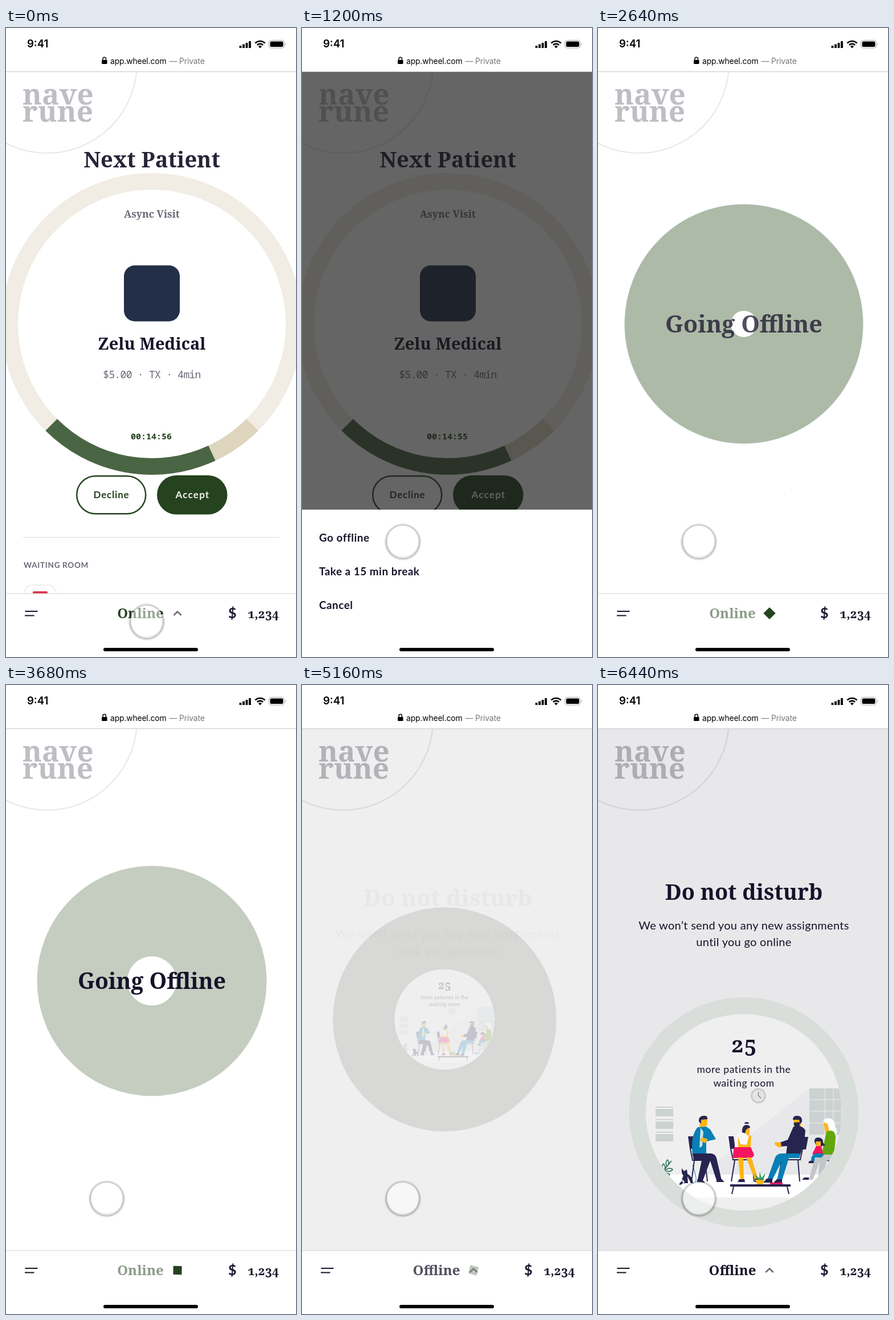
Write an HTML page that moves like this. It is 509 px wide and 1101 px high and loops after 6.48 s.

```html
<!DOCTYPE html>
<html lang="en">
<head>
<meta charset="utf-8">
<title>Going offline</title>
<style>
html, body { margin: 0; height: 100%; overflow: hidden; background: #fff; }
svg { display: block; width: 100vw; height: 100vh; }
text { fill: #17122a; white-space: pre; }
.serif { font-family: "Noto Serif", serif; font-weight: 700; font-variant-numeric: oldstyle-nums; }
.sans { font-family: Lato, sans-serif; }
.mono { font-family: "Noto Sans Mono", monospace; }
.ui { font-family: Inter, sans-serif; }
.mid { text-anchor: middle; }
.bold { font-weight: 700; }
.gray { fill: #6b6776; }
.line { fill: none; stroke: #17122a; stroke-width: 2.2; }
.navy { fill: #27244f; }
.blue { fill: #087fb5; }
.skin { fill: #ffb515; }
.pink { fill: #f4165f; }
.wall { fill: #ccd2d1; }
.seat { fill: none; stroke: #27244f; stroke-width: 2; }
</style>
</head>
<body>
<svg viewBox="0 0 509 1101">
  <defs>
    <clipPath id="hole"><circle cx="256" cy="748" r="172"/></clipPath>
    <radialGradient id="shadow">
      <stop offset=".84" stop-opacity="0"/>
      <stop offset=".86" stop-opacity=".28"/>
      <stop offset="1" stop-opacity="0"/>
    </radialGradient>
  </defs>

  <rect id="page" width="509" height="1101" fill="#fff"/>
  <circle cx="72" cy="61" r="158" fill="none" stroke="#000" stroke-opacity=".09" stroke-width="2.2"/>
  <g class="serif" font-size="51" style="font-weight:800" opacity=".27">
    <text x="29" y="134">nave</text><text x="29" y="164">rune</text>
  </g>

  <g id="ring" fill="none" stroke-width="29">
    <circle id="track" cx="256" cy="518" stroke="#f1ece4"/>
    <path id="rest" stroke="#ddd5bd"/>
    <path id="left" stroke="#4a6543"/>
  </g>
  <circle id="disc" fill="none"/>

  <g id="visit">
    <text class="serif mid" x="256" y="244" font-size="38" style="fill:#282337">Next Patient</text>
    <text class="serif mid gray" x="256" y="332" font-size="17.600">Async Visit</text>
    <rect x="207" y="415.500" width="98" height="98" rx="19" fill="#232f47"/>
    <text class="serif mid" x="256" y="563" font-size="29">Zelu Medical</text>
    <text class="mono mid gray" x="256" y="613" font-size="18" letter-spacing="-.72">$5.00 · TX · 4min</text>
    <text id="timer" class="mono mid bold" x="255" y="720" font-size="15" style="fill:#25431f"></text>
    <path d="M30 891.500H480" stroke="#d8d8d8"/>
    <text class="sans gray bold" x="31" y="945" font-size="13.500" letter-spacing=".7">WAITING ROOM</text>
    <rect x="31.500" y="975" width="57" height="57" rx="16" fill="#fff" stroke="#ddd"/>
    <rect x="47" y="986" width="26" height="26" rx="2" fill="#d7334a"/>
  </g>
  <g id="decline">
    <rect x="124.200" y="784.200" width="121" height="66" rx="33" fill="#fff" stroke="#25431f" stroke-width="2.500"/>
    <text class="sans mid bold" x="185" y="823" font-size="17" letter-spacing=".8" style="fill:#25431f">Decline</text>
  </g>
  <g id="accept">
    <rect x="265" y="783" width="123.500" height="68.500" rx="34" fill="#25431f"/>
    <text class="sans mid bold" x="327.500" y="823" font-size="17" letter-spacing="1.200" style="fill:#f6f3e9">Accept</text>
  </g>

  <g id="scene"><g clip-path="url(#hole)">
    <rect x="80" y="570" width="352" height="360" fill="#f0eff0"/>
    <path d="M368 708L180 857H432V708Z" fill="#e8e8ea"/>
    <rect x="80" y="857" width="352" height="40" fill="#fff"/>
    <text class="serif mid" x="256" y="643" font-size="37.500">25</text>
    <g class="sans mid" font-size="17.500" letter-spacing=".55">
      <text x="256" y="679">more patients in the</text><text x="256" y="703">waiting room</text>
    </g>
    <circle cx="281.500" cy="719" r="12" fill="#e4e4e4" stroke="#c4c7c7" stroke-width="2.500"/>
    <path d="M281.500 712V719L286 723" fill="none" stroke="#777" stroke-width="1.200"/>
    <path class="wall" d="M371 706H427V787H371Z"/>
    <path d="M371 726H427M371 746H427M371 767H427M398 706V787M413 706V787" stroke="#eee"/>
    <path class="wall" d="M101 738h31v17h-31zM101 760h31v17h-31zM101 782h31v17h-31z"/>
    <path d="M100 741h32M100 763h32M100 785h32" stroke="#f4f4f4" stroke-width="2"/>
    <path d="M108 862Q116 848 129 833M115 851q-5-8 0-13q6 6 0 13M121 843q-4-8 1-12q5 6-1 12M117 850q9-7 14-2q-5 6-14 2M112 857q10-5 14 0q-6 5-14 0"
      fill="none" stroke="#1e6650" stroke-width="1.500"/>
    <path class="navy" d="M147 846l4 5l5-3l1 8q8 3 10 16h-18q-3-8 1-13q-4-4-3-13zM149 866l-7 8l3 1l7-5z"/>
    <path d="M157 860l6 12h-5z" fill="#fff"/>
    <path d="M166 873q9-1 5-16t-5-17" fill="none" stroke="#087fb5"/>

    <path class="navy" d="M158 790h9l3 22h-9z"/>
    <path class="seat" d="M162 812L166 832H188M169 833L164 869M188 833L192 869"/>
    <path class="skin" d="M179 759h13v10q-2 5-7 4v5h-7z"/>
    <path class="navy" d="M177 764q-1-9 8-10q8-1 7 6l-11 1v7z"/>
    <path class="blue" d="M175 774L190 773L197 778L207 795L190 799V824H166Q162 788 175 774Z"/>
    <path d="M180 775l5 7l-2 25l-5 3z" fill="#c9e4ef"/>
    <path class="skin" d="M193 795l-11-3l-3 5l9 5z"/>
    <path class="navy" d="M166 820H199Q206 821 208 828L217 867H208L197 833L183 870H174L182 832H168Z"/>
    <path class="navy" d="M174 866h9l5 5h-14zM208 864h8l6 6h-14z"/>

    <path class="navy" d="M229 790h9l3 22h-9z"/>
    <path class="seat" d="M233 812L237 831H270M240 832L234 869M270 832L274 869"/>
    <path class="skin" d="M254 774h12v12q-3 5-7 2l-4 5z"/>
    <path class="navy" d="M253 784q-1-13 7-14q7 0 7 5q-8 0-9 10zM257 768a4 3 0 1 1 8 0z"/>
    <path d="M248 784q8-3 15 5l6 21h-29q0-20 8-26z" fill="#f8f8f8"/>
    <path class="skin" d="M246 790l4 14l11 1l4-17l4 1l-1 20l-22 2z"/>
    <path class="pink" d="M239 809H268L274 822Q273 828 265 828H236Z"/>
    <path class="skin" d="M246 827h9l1 38l-6 3zM260 827h9l12 38l-5 3z"/>
    <path class="navy" d="M248 865l9 0l1 5h-13zM276 864l6 0l6 6h-13z"/>

    <path class="navy" d="M359 791h10l-4 22h-9z"/>
    <path class="seat" d="M359 812L355 831H318M351 832L354 869M322 832L316 869"/>
    <path class="skin" d="M343 757h13v17h-7q-6 0-6-6z"/>
    <path class="navy" d="M342 761q0-7 7-7q10 0 9 10l-3 5l-2-8zM344 766l10-1v9h-6q-5-2-4-8z"/>
    <path class="navy" d="M343 773Q359 769 364 780Q363 800 353 828H329L332 807L319 808V801L333 796Z"/>
    <path class="skin" d="M321 801l-10-1l-1 4l6 5h6z"/>
    <path class="blue" d="M354 828H325L306 866H297L311 827Q314 820 323 820H354ZM335 828L323 867H314L324 826Z"/>
    <path class="navy" d="M296 864h10v7h-16zM314 865h9v6h-15z"/>

    <path class="seat" d="M407 832H390M405 832L408 866"/>
    <path class="skin" d="M396 765h10l2 18h-9z"/>
    <path d="M395 765q3-9 14-6q8 4 7 14q7 10 0 15q-8 1-10-7l-3-13z" fill="#fff"/>
    <path d="M401 782q15-7 16 10l-3 32h-22z" fill="#62a60c"/>
    <path d="M392 822h23q-3 11-13 10l-9 36h-7l3-34l-12 32h-7l10-36z" fill="#c3c6c8"/>
    <path class="navy" d="M362 862h8v4h-12zM385 863h8v4h-12z"/>
    <path class="navy" d="M380 800q-1-8 7-8q9 1 8 9l4 5l-6 1h-9z"/>
    <path class="skin" d="M382 799h9v10h-7z"/>
    <path class="pink" d="M383 807h9l4 17h-15l-5-3z"/>
    <path class="blue" d="M381 820h15l-3 7h-12l-2 9h-6l2-11z"/>
    <path class="navy" d="M371 833h7v4h-9z"/>

    <path class="navy" d="M232 874H338V878H232Z"/>
    <path class="seat" d="M238 878L235 891M332 878L335 891"/>
    <path d="M276 866h16l-3 8h-10z" fill="#ffb515"/>
    <path d="M280 866l-6-10l9 7l1-11l3 11l7-9l-4 13z" fill="#3b9a5b"/>
    <path class="pink" d="M302 871h22v3h-22z"/>
  </g></g>

  <text id="going" class="serif mid" font-size="39" x="256" y="532">Going Offline</text>
  <g id="quiet">
    <text class="serif mid" x="256" y="376" font-size="37.800">Do not disturb</text>
    <g class="sans mid" font-size="20" letter-spacing=".3">
      <text x="256" y="428">We won’t send you any new assignments</text>
      <text x="256" y="457">until you go online</text>
    </g>
  </g>

  <path d="M0 990H509V1101H0Z" fill="#fff"/>
  <path d="M0 990H509" stroke="#d3d3d5"/>
  <path class="line" d="M33.500 1021H55.500M33 1028.500H49.500"/>
  <text id="online" class="serif mid" x="236" y="1033" font-size="24" style="fill:#25431f">Online</text>
  <text id="offline" class="serif mid" x="236" y="1033" font-size="24">Offline</text>
  <path id="chevron" d="M294.500 1028L301 1021.500L307.500 1028" fill="none" stroke="#6b6776" stroke-width="2.500"/>
  <rect id="spinner" x="-7.500" y="-7.500" width="15" height="15" fill="#25431f"/>
  <text class="sans bold" x="390" y="1033" font-size="25">$</text>
  <text class="serif" x="479" y="1033" font-size="20.800" text-anchor="end">1,234</text>

  <rect id="shade" y="77" width="509" height="1024" fill="#1c1c1c"/>
  <g id="sheet" class="sans bold" font-size="18.800" letter-spacing=".55">
    <rect y="843" width="509" height="260" fill="#fff"/>
    <text x="30" y="899">Go offline</text>
    <text x="30" y="958">Take a 15 min break</text>
    <text x="30" y="1017">Cancel</text>
  </g>

  <g id="touch">
    <circle cy="1.500" r="33" fill="url(#shadow)"/>
    <circle r="28" fill="#fff" fill-opacity=".52" stroke="#d0d0d0" stroke-width=".8"/>
  </g>

  <rect width="509" height="76" fill="#fff"/>
  <path d="M0 76.500H509" stroke="#c8c8c8"/>
  <g class="ui">
    <text x="37" y="34" font-size="18.500" font-weight="600" style="fill:#000">9:41</text>
    <text x="183" y="63" font-size="13.800" letter-spacing="-.1" style="fill:#000">app.wheel.com</text>
    <text x="286.500" y="63" font-size="13.800" letter-spacing="-.1" style="fill:#777">— Private</text>
  </g>
  <rect x="168" y="56" width="9.500" height="7" rx="1.300"/>
  <path d="M170 57V54a2.700 2.700 0 0 1 5.400 0V57" fill="none" stroke="#000" stroke-width="1.400"/>
  <path d="M411.500 35V31M417 35V28.500M422.500 35V26M428 35V23" stroke="#000" stroke-width="3.800"/>
  <path d="M437.500 26.500a12 12 0 0 1 17 0M440.800 29.800a7.400 7.400 0 0 1 10.400 0" fill="none" stroke="#000" stroke-width="2.600"/>
  <path d="M446 35.500l-3-3.200a4.300 4.300 0 0 1 6 0z"/>
  <rect x="461.500" y="21.500" width="27" height="13.500" rx="4" fill="none" stroke="#aaa"/>
  <rect x="463.500" y="23.500" width="23" height="9.500" rx="2.300"/>
  <path d="M490.500 26v4.500q2-2.200 0-4.500z" fill="#999"/>
  <rect x="171" y="1085" width="166" height="6" rx="3"/>
</svg>
<script>
const $ = id => document.getElementById(id);
const set = (id, attrs) => { for (const k in attrs) $(id).setAttribute(k, attrs[k]); };
const fade = (id, opacity) => set(id, { opacity });
const clamp = x => Math.min(1, Math.max(0, x));
const span = (t, a, b) => clamp((t - a) / (b - a));
const mix = (a, b, p) => a + (b - a) * p;
const inOut = p => p < .5 ? 2 * p * p : 1 - 2 * (1 - p) ** 2;
const out = p => 1 - (1 - p) ** 2;
const zoom = (x, y, s) => `translate(${x} ${y}) scale(${s}) translate(${-x} ${-y})`;

// Piecewise blend through rows of [time, ...values]
function track(rows, t, ease = p => p) {
  let i = 0;
  while (i < rows.length - 2 && t > rows[i + 1][0]) i++;
  const [a, b] = [rows[i], rows[i + 1]];
  const p = ease(span(t, a[0], b[0]));
  return a.slice(1).map((v, j) => mix(v, b[j + 1], p));
}

function arc(r, from, to) {
  const at = deg => {
    const a = deg * Math.PI / 180;
    return `${256 + r * Math.cos(a)} ${518 + r * Math.sin(a)}`;
  };
  return `M${at(from)}A${r} ${r} 0 0 1 ${at(to)}`;
}

const discPath = [
  [4880, 256, 518, 201.5, 92],
  [5680, 233, 791, 180, 75],
  [6400, 256, 748, 201.5, 172]
];
const discTint = [
  [2640, 174, 186, 168], [3680, 197, 205, 192], [4480, 218, 220, 215],
  [5680, 215, 215, 215], [6400, 217, 222, 218]
];

function draw(t) {
  // Action sheet
  const up = inOut(span(t, 120, 600)) * (1 - inOut(span(t, 1440, 1900)));
  fade('shade', .68 * up);
  set('sheet', { transform: `translate(0 ${260 * (1 - up)})` });
  const move = inOut(span(t, 720, 1120));
  set('touch', { transform: `translate(${mix(247, 177, move)} ${mix(1038, 898, move)})` });
  $('timer').textContent = '00:14:' + (t < 640 ? 56 : t < 1640 ? 55 : 54);

  // Visit ring closes into a disc
  const k = 1 - inOut(span(t, 2000, 2857));
  const keep = clamp((k - .12) / .88);
  let x = 256, y = 518, r = mix(201.5, 264, k);
  let hole = Math.max(k * 235 - 7 * (1 - keep), (t - 2640) * .0413, 0);
  const mid = (r + hole) / 2, width = r - hole;
  set('track', { r: mid });
  set('rest', { d: arc(mid, 45, 65) });
  set('left', { d: arc(mid, 65, 135) });
  set('ring', { opacity: keep, 'stroke-width': width });
  fade('visit', clamp(2 * k - 1));
  set('visit', { transform: zoom(256, 518, mix(.8, 1, k)) });
  set('decline', { transform: zoom(184.5, 817, keep) });
  set('accept', { transform: zoom(327, 817, keep) });

  // Disc travels down and opens on the waiting room
  if (t > 4880) [x, y, r, hole] = track(discPath, t, inOut);
  const rgb = track(discTint, t).map(Math.round);
  set('disc', {
    cx: x, cy: y, r: (r + hole) / 2, 'stroke-width': r - hole,
    stroke: `rgb(${rgb})`, opacity: 1 - keep
  });
  set('scene', {
    opacity: span(t, 5100, 5400),
    transform: `translate(${x} ${y}) scale(${hole / 172}) translate(-256 -748)`
  });

  set('going', {
    opacity: clamp(1 - 2 * k) * (1 - span(t, 4880, 5150)),
    transform: zoom(256, 518, 1 + .48 * k)
  });
  const away = span(t, 4880, 5280);
  set('page', { fill: `rgb(${[232, 232, 234].map(c => Math.round(mix(255, c, away)))})` });
  set('quiet', {
    opacity: span(t, 5150, 5500),
    transform: zoom(256, 215, 1 + .08 * (1 - out(span(t, 5100, 6200))))
  });

  // Bottom bar
  const busy = span(t, 2000, 2500);
  fade('online', mix(1, .52, busy) * (1 - away));
  fade('offline', away);
  fade('chevron', 1 - busy + away);
  set('spinner', {
    opacity: busy * (1 - away),
    transform: `translate(301 1024.5) rotate(${45 + .131 * (t - 2640)})`
  });
}

const start = performance.now();
function tick() {
  draw((performance.now() - start) % 6480);
  requestAnimationFrame(tick);
}
draw(0);
requestAnimationFrame(tick);
</script>
</body>
</html>
```
